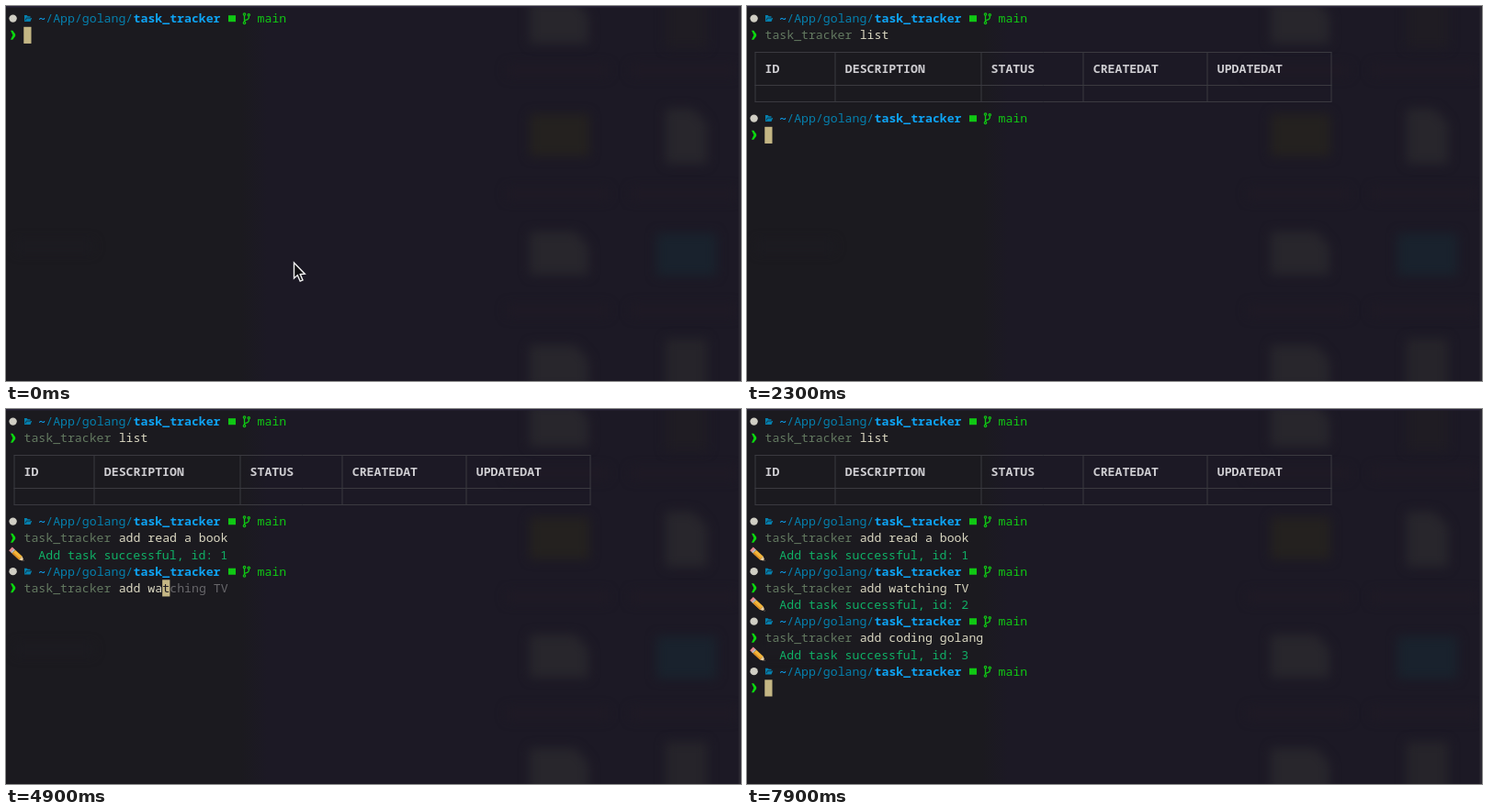
These frames come from a looping animation (800x409 px, 8000 ms). An HTML page with a canvas:

```html
<!DOCTYPE html>
<html lang="en">
<head>
<meta charset="utf-8">
<title>task_tracker</title>
<style>
  html, body { margin: 0; height: 100%; overflow: hidden; background: #1c1a23; }
  canvas { display: block; width: 100vw; height: 100vh; }
</style>
</head>
<body>
<canvas id="stage" width="800" height="409"></canvas>
<script>
const ctx = document.getElementById('stage').getContext('2d');
const LOOP = 8000, LEFT = 3.6, CELL = 7.94, LINE = 18.17, FIRST = 13.6;
const FONT = '13.2px "Noto Sans Mono", "DejaVu Sans Mono", monospace';
const color = {
  path: '#0580ae', dir: '#0ea4f5', branch: '#10c814', arrow: '#0bd80f',
  command: '#647a61', args: '#dbd8c2', ghost: '#68676b', success: '#10b066',
  header: '#cfced2', rule: '#3b3a40', block: '#c4b684', dark: '#1c1a22', logo: '#d0cec4'
};
const colX = col => LEFT + col * CELL;
const rowY = row => FIRST + row * LINE;

// [time, number of finished commands, typed text, dimmed suggestion]
const CMD = 'task_tracker ';
const steps = [
  [0, 0, '', ''],
  [100, 0, 't', 'ask_tracker list'],
  [300, 0, 'ta', 'sk_tracker list'],
  [500, 0, 'tas', 'k_tracker list'],
  [800, 0, 'task', '_tracker list'],
  [900, 0, 'task_', 'tracker list'],
  [1000, 0, 'task_t', 'racker list'],
  [1100, 0, 'task_tr', 'acker list'],
  [1200, 0, 'task_tra', 'cker list'],
  [1400, 0, 'task_tracker', ' list'],
  [1500, 0, CMD, 'list'],
  [1600, 0, CMD + 'l', 'ist'],
  [1700, 0, CMD + 'li', 'st'],
  [1800, 0, CMD + 'lis', 't'],
  [1900, 0, CMD + 'list', ''],
  [2200, 1, '', ''],
  [2600, 1, CMD + 'list', ''],
  [3100, 1, CMD + 'lis', 't'],
  [3200, 1, CMD + 'li', 'st'],
  [3300, 1, CMD + 'l', 'ist'],
  [3400, 1, CMD, 'list'],
  [3500, 1, CMD + 'a', 'dd read a book'],
  [3600, 1, CMD + 'ad', 'd read a book'],
  [3700, 1, CMD + 'add read a book', ''],
  [3900, 2, '', ''],
  [4000, 2, CMD + 'add read a book', ''],
  [4400, 2, CMD + 'add read a ', 'book'],
  [4500, 2, CMD + 'add read ', 'a book'],
  [4600, 2, CMD + 'add ', 'read a book'],
  [4700, 2, CMD + 'add w', 'atching TV'],
  [4900, 2, CMD + 'add wa', 'tching TV'],
  [5000, 2, CMD + 'add watching TV', ''],
  [5300, 3, '', ''],
  [5800, 3, CMD + 'add watching TV', ''],
  [6800, 3, CMD + 'add read a book', ''],
  [6900, 3, CMD + 'add read a ', 'book'],
  [7000, 3, CMD + 'add read ', 'a book'],
  [7100, 3, CMD + 'add ', 'read a book'],
  [7300, 3, CMD + 'add c', 'oding golang'],
  [7400, 3, CMD + 'add co', 'ding golang'],
  [7500, 3, CMD + 'add coding golang', ''],
  [7700, 4, '', '']
];
const finished = ['list', 'add read a book', 'add watching TV', 'add coding golang'];

function write(text, col, row, fill, weight = 400) {
  ctx.font = weight + ' ' + FONT;
  ctx.fillStyle = fill;
  ctx.fillText(text, colX(col), rowY(row) + 4.6);
}

function shape(points, fill, g = ctx) {
  g.beginPath();
  points.forEach(([x, y]) => g.lineTo(x, y));
  g.closePath();
  g.fillStyle = fill;
  g.fill();
}

function disc(x, y, r, fill) {
  ctx.beginPath();
  ctx.arc(x, y, r, 0, 7);
  ctx.fillStyle = fill;
  ctx.fill();
}

function line(points, stroke, width) {
  ctx.beginPath();
  points.forEach(([x, y]) => ctx.lineTo(x, y));
  ctx.strokeStyle = stroke;
  ctx.lineWidth = width;
  ctx.stroke();
}

// Runs a drawing at the given offset.
function at(x, y, draw) {
  ctx.save();
  ctx.translate(x, y);
  draw();
  ctx.restore();
}

function makeBackdrop() {
  const layer = document.createElement('canvas');
  layer.width = 800;
  layer.height = 409;
  const g = layer.getContext('2d');
  const tint = g.createLinearGradient(255, 0, 285, 0);
  tint.addColorStop(0, '#1b1a1f');
  tint.addColorStop(1, '#1c1925');
  g.fillStyle = tint;
  g.fillRect(0, 0, 800, 409);

  const box = (x, y, w, h, fill) => { g.fillStyle = fill; g.fillRect(x, y, w, h); };
  g.filter = 'blur(6px)';
  for (const y of [-6, 246, 370]) {
    shape([[570, y], [620, y], [634, y + 16], [634, y + 47], [570, y + 47]], '#28262c', g);
  }
  box(570, 118, 65, 46, '#24211f');
  shape([[718, 112], [748, 112], [763, 128], [763, 172], [718, 172]], '#28262c', g);
  box(718, -20, 45, 66, '#1f1c23');
  box(708, 248, 65, 46, '#19222d');
  box(718, 363, 45, 60, '#26242a');
  for (const y of [70, 205, 332]) {
    box(545, y - 6, 110, 12, '#1f1a25');
    box(680, y - 6, 115, 12, '#1f1a25');
  }
  box(10, 256, 85, 12, '#1c1b21');
  g.filter = 'none';
  box(0, 0, 800, 1.5, '#292439');
  box(797.5, 0, 2.5, 409, '#2b2832');
  return layer;
}
const backdrop = makeBackdrop();

function prompt(row) {
  at(0, rowY(row), () => {
    disc(7.6, 0, 4.2, color.logo);
    shape([[20, -3.5], [22.7, -3.5], [23.7, -2.4], [26.5, -2.4], [26.5, -0.7],
           [28.2, -0.7], [26.5, 3.3], [20, 3.3]], color.path);
    line([[21, 2.2], [22.2, -0.5], [27, -0.5]], color.dark, 0.7);
    ctx.fillStyle = color.branch;
    ctx.fillRect(242, -3.4, 8, 7);
    line([[259.5, -4], [259.5, 4.5]], color.branch, 1.3);
    line([[264.3, -3], [264.3, -0.5], [263, 1], [259.5, 2.2]], color.branch, 1.3);
    for (const [x, y] of [[259.5, -4.5], [264.3, -3.8], [259.5, 4.8]]) {
      disc(x, y, 1.8, color.branch);
      disc(x, y, 0.6, color.dark);
    }
  });
  write('~', 4, row, color.dir, 700);
  write('/App/golang/', 5, row, color.path);
  write('task_tracker', 17, row, color.dir, 700);
  write('main', 34, row, color.branch);
  at(0, rowY(row + 1), () =>
    shape([[5, -5], [7.3, -5], [10.2, -1], [10.2, 1], [7.3, 5], [5, 5], [7.4, 0]], color.arrow));
}

function input(text, row) {
  write(text.slice(0, CMD.length), 2, row, color.command);
  write(text.slice(CMD.length), 2 + CMD.length, row, color.args);
}

function table(row) {
  const edges = [0, 11, 31, 45, 62, 79];
  const edgeX = col => Math.round(9 + col * CELL) + 0.5;
  const ruleY = i => Math.round(rowY(row + i) + 1) - 0.5;
  const [top, mid, bottom] = [0, 2, 3].map(ruleY);
  for (const y of [top, mid, bottom]) line([[8.5, y], [edgeX(79), y]], color.rule, 1);
  for (const col of edges) line([[edgeX(col) - 0.5, top], [edgeX(col) - 0.5, bottom]], color.rule, 1);
  ['ID', 'DESCRIPTION', 'STATUS', 'CREATEDAT', 'UPDATEDAT'].forEach((name, i) =>
    write(name, edges[i] + 2, row + 1, color.header, 700));
}

function pencil(row) {
  at(12.3, rowY(row) + 0.3, () => {
    ctx.rotate(0.75);
    ctx.fillStyle = '#e58b91';
    ctx.fillRect(-10, -2.6, 3, 5.2);
    ctx.fillStyle = '#b8bcc0';
    ctx.fillRect(-7.4, -2.6, 2, 5.2);
    ctx.fillStyle = '#f3b53a';
    ctx.fillRect(-5.4, -2.6, 10.4, 5.2);
    ctx.fillStyle = '#dc8e25';
    ctx.fillRect(-5.4, 0.8, 10.4, 1.8);
    shape([[5, -2.6], [10, 0], [5, 2.6]], '#ecd0a0');
    shape([[8, -1.1], [10.3, 0], [8, 1.1]], '#333033');
  });
}

function pointer() {
  const outline = [[313.5, 280], [313.5, 297], [317.3, 293.6], [320.2, 300.2],
                   [323, 299], [320.2, 292.6], [325.3, 292.2]];
  shape(outline, '#111013');
  line([...outline, outline[0], outline[1]], '#f2f2f2', 1.4);
}

function draw(time) {
  const [, done, typed, ghost] = steps.findLast(step => step[0] <= time);
  ctx.drawImage(backdrop, 0, 0);

  let row = 0;
  for (let i = 0; i < done; i++) {
    prompt(row);
    input(CMD + finished[i], row + 1);
    if (i === 0) {
      table(2);
      row = 6;
    } else {
      pencil(row + 2);
      write('Add task successful, id: ' + i, 4, row + 2, color.success);
      row += 3;
    }
  }

  prompt(row);
  row++;
  input(typed, row);
  const end = 2 + typed.length;
  ctx.fillStyle = color.block;
  ctx.fillRect(colX(end) - 0.2, rowY(row) - 9, CELL + 0.3, LINE);
  write(ghost.slice(0, 1), end, row, color.dark);
  write(ghost.slice(1), end + 1, row, color.ghost);
  if (time < 100) pointer();
}

function tick(now) {
  draw(now % LOOP);
  requestAnimationFrame(tick);
}
draw(0);
requestAnimationFrame(tick);
</script>
</body>
</html>
```
